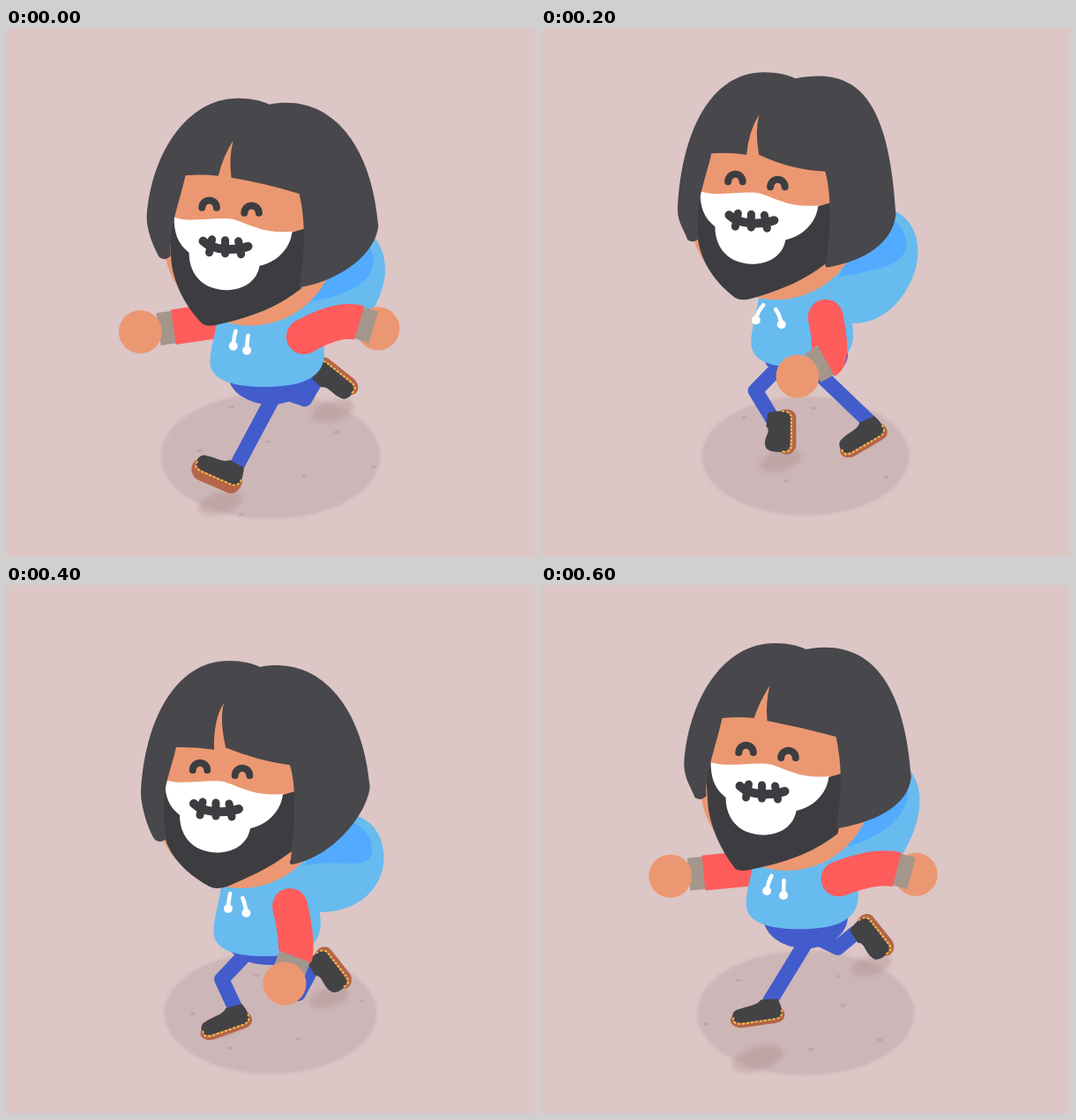
An HTML page with a canvas that plays this animation: 600x600 px, repeating every 0.64 s.

```html
<!DOCTYPE html>
<html lang="en">
<head>
<meta charset="utf-8">
<title>Running character</title>
<style>
html, body { margin: 0; width: 100%; height: 100%; overflow: hidden; background: #dcc6c6; }
canvas { display: block; width: 600px; height: 600px; }
</style>
</head>
<body>
<canvas id="stage" width="600" height="600"></canvas>
<script>
const ctx = document.getElementById('stage').getContext('2d');
const LOOP = 640, STRIDE = 320, STEP = 40, TAU = Math.PI * 2;
const { sin, cos, hypot, max, min, sqrt } = Math;
const C = {
  bg: '#dcc6c6', ground: '#cdb6b7', speck: '#bfa5a6', hair: '#48474b', beard: '#3d3d41',
  skin: '#eb9872', shirt: '#68bbee', lining: '#52abff', sleeve: '#ff5c5c', cuff: '#a4968b',
  pants: '#425ccb', shoe: '#434346', sole: '#b56549', stitch: '#f4c744', white: '#ffffff'
};

// Key points of one step: time, x, y, angle in degrees.
const FOOT_PATH = [
  [0, 243, 501, 25], [80, 276, 511, -18], [200, 364, 463, -29], [290, 402, 414, -133],
  [420, 357, 443, -122], [520, 299, 473, -88], [600, 246, 485, -7]
];
// Key points of one arm swing: time, x, y.
const HAND_PATH = [
  [0, 422, 341], [120, 377, 412], [200, 291, 395],
  [300, 270, 405], [400, 316, 452], [520, 410, 331]
];

// Smooth closed curve through rows of [time, ...values].
function sample(rows, time) {
  const n = rows.length, t = time % LOOP;
  let i = n - 1;
  while (rows[i][0] > t) i--;
  const key = k => {
    const lap = Math.floor(k / n), row = rows[k - lap * n];
    return { t: row[0] + lap * LOOP, v: row };
  };
  const [a, b, c, d] = [key(i - 1), key(i), key(i + 1), key(i + 2)];
  const h = c.t - b.t, u = (t - b.t) / h, u2 = u * u, u3 = u2 * u;
  return b.v.slice(1).map((p, k) => {
    const j = k + 1, q = c.v[j];
    const m0 = (q - a.v[j]) / (c.t - a.t) * h;
    const m1 = (d.v[j] - p) / (d.t - b.t) * h;
    return (2 * u3 - 3 * u2 + 1) * p + (u3 - 2 * u2 + u) * m0 +
      (3 * u2 - 2 * u3) * q + (u3 - u2) * m1;
  });
}

// Middle joint of a two-part limb; side picks the way it bends.
function joint(x0, y0, x1, y1, a, b, side) {
  const dx = x1 - x0, dy = y1 - y0, d = hypot(dx, dy);
  const along = d < a + b ? (a * a + d * d - b * b) / (2 * d) : d * a / (a + b);
  const out = d < a + b ? side * sqrt(max(0, a * a - along * along)) : 0;
  return [x0 + (dx * along - dy * out) / d, y0 + (dy * along + dx * out) / d];
}

// Each segment holds 2, 4 or 6 numbers: line, quadratic or cubic.
function trace(x, y, ...segments) {
  ctx.beginPath();
  ctx.moveTo(x, y);
  for (const s of segments) {
    if (s.length === 2) ctx.lineTo(...s);
    else if (s.length === 4) ctx.quadraticCurveTo(...s);
    else ctx.bezierCurveTo(...s);
  }
}
function fill(color) {
  ctx.fillStyle = color;
  ctx.fill();
}
function stroke(color, width, cap = 'round') {
  ctx.strokeStyle = color;
  ctx.lineWidth = width;
  ctx.lineCap = cap;
  ctx.lineJoin = 'round';
  ctx.stroke();
}
function oval(x, y, rx, ry, color, angle = 0) {
  ctx.beginPath();
  ctx.ellipse(x, y, rx, ry, angle, 0, TAU);
  fill(color);
}
function softOval(blur, ...shape) {
  ctx.save();
  ctx.filter = `blur(${blur}px)`;
  oval(...shape);
  ctx.restore();
}

function drawGround(t, radius) {
  softOval(1.5, 300, 485.5, radius, radius * 0.573, C.ground);
  for (let i = 1; i <= 14; i++) {
    const u = (i * 0.755 + t / STRIDE) % 1 - 0.5, v = (i * 0.57) % 1 - 0.5;
    const x = 258 * u + 130 * v, y = 150 * v - 147 * u;
    if (hypot(x, y / 0.573) < radius * 0.97) oval(300 + x, 485.5 + y, 3, 1.7, C.speck);
  }
}

function drawShoe(x, y, turn) {
  const side = sin(turn) ** 2, toe = 6 + 8 * side, depth = 5 + 13 * max(0, sin(turn));
  ctx.save();
  ctx.translate(x, y);
  ctx.rotate(turn);
  ctx.scale(1 - 0.18 * side, 1 + 0.2 * side);
  trace(-27, -1, [-37, 4, -31, 10 + depth, -18, 10 + depth], [19, 9 + depth],
    [30, 9 + depth, 33, 4, 27, -2]);
  fill(C.sole);
  trace(5, -14, [24, -13], [27, -7, 28, 0, 27, 5], [22, 9], [-20, 9],
    [-32, 9, -32, 1 - toe, -22, -toe], [-11, -toe - 3, 0, -8, 5, -14]);
  fill(C.shoe);
  trace(-28, 2, [-31, 10, -23, 10.5, -17, 10.5], [19, 9.5], [26, 9, 28, 4, 27, 0]);
  ctx.setLineDash([3, 2]);
  stroke(C.stitch, 1.8, 'butt');
  ctx.restore();
}

function footAt(t, dx, dy) {
  const [x, y, degrees] = sample(FOOT_PATH, t);
  const drop = max(4, 539 - 0.576 * (x - 243) - y);
  softOval(2.5, x + dx, y + dy + drop, 15 + 0.28 * drop, 7 + 0.13 * drop,
    'rgba(165,125,130,.3)', -0.28);
  return { x: x + dx, y: y + dy, turn: degrees * Math.PI / 180 };
}

function drawLeg({ x, y, turn }, hipX, hipY, fold) {
  const ax = x + 15 * cos(turn) + 11 * sin(turn);
  const ay = y + 15 * sin(turn) - 11 * cos(turn);
  // Foreshortening trades thigh length for shin length.
  const knee = joint(hipX, hipY, ax, ay, 53 + 14 * fold, 33 - 7 * fold, 1);
  trace(hipX, hipY, knee, [ax, ay]);
  stroke(C.pants, 17);
  drawShoe(x, y, turn);
}

function drawArm(sx, sy, hx, hy, bends) {
  const [ex, ey] = bends ? joint(sx, sy, hx, hy, 46, 46, -1) : [(sx + hx) / 2, (sy + hy) / 2];
  const len = hypot(hx - ex, hy - ey) || 1;
  const ux = (hx - ex) / len, uy = (hy - ey) / len, reach = 30 - 8 * ux;
  const wx = hx - ux * reach, wy = hy - uy * reach;
  const hand = () => oval(hx, hy, 24.5, 24.5, C.skin);
  const front = ux < 0;
  if (!front) hand();
  trace(wx - ux * 2, wy - uy * 2, [wx + ux * 17, wy + uy * 17]);
  stroke(C.cuff, 37, 'butt');
  oval(sx, sy, 20, 20, C.sleeve);
  trace(sx, sy, [ex, ey, wx, wy]);
  stroke(C.sleeve, 40, 'butt');
  if (front) hand();
}

function drawHood(x, y, end, tail) {
  trace(x - 100, y - 30, [x - 30, y - 48], [x - 12, y - 42, x, y - 25, x, y],
    [x, y + 32, x - 28, end, x - 72, end], [x - 150, end]);
  fill(C.shirt);
  trace(x - 90, tail, [x - 45, tail - 8, x - 14, y + 16, x - 13, y - 10],
    [x - 14, y - 32, x - 35, y - 46, x - 60, y - 46]);
  fill(C.lining);
}

function drawShirt(left, right, bottom) {
  trace(left + 10, bottom - 90, [left + 7, bottom - 60, left, bottom - 45, left, bottom - 28],
    [left, bottom - 5, 265, bottom, 292, bottom],
    [327, bottom, right, bottom - 6, right, bottom - 38],
    [right - 2, bottom - 60], [right - 20, bottom - 90]);
  fill(C.shirt);
}

function drawString(x, y, dx, dy) {
  trace(x, y, [x + dx * 0.75, y + dy * 0.4, x + dx, y + dy]);
  stroke(C.white, 4.5);
  oval(x + dx, y + dy, 5, 5, C.white);
}

function drawFace(chin) {
  oval(46, 40, 98, 98, C.skin);
  trace(-26, -78, [98, -78], [112, 30], [-42, 20]);
  fill(C.skin);

  trace(-47, 7, [-40, 15], [30, 50], [94, 32], [111, 27], [112, 60, 104, 96],
    [80, 115, 50, 128, chin + 16, 136], [chin + 4, 140, chin - 4, 136],
    [-30, 113, -40, 88, -43, 66]);
  fill(C.beard);

  trace(-40, 15, [-20, 22, 12, 13, 30, 18], [50, 25, 65, 34, 94, 31],
    [92, 52, 74, 67, 57, 70], [54, 88, 38, 97.5, 19, 97.5],
    [-6, 97, -23, 81, -23, 55], [-36, 45, -40, 32, -40, 15]);
  fill(C.white);

  for (const eye of [0, 1]) {
    ctx.beginPath();
    ctx.arc(eye * 48, 4 + eye * 6, 8.3, Math.PI, TAU);
    stroke(C.beard, 8);
  }

  trace(-7, 42, [4, 53, 30, 53, 44, 48]);
  stroke(C.beard, 10);
  for (const i of [-1, 0, 1]) {
    trace(18 + 16 * i - i, 41 + i, [18 + 18 * i, 56 + i]);
    stroke(C.beard, 9);
  }
}

// flare: strands hang low; drift: sides swing down; lift: right side opens.
function drawHair(flare, drift, lift) {
  const lx = -27, ly = -27.5 + 7.5 * flare;
  const sx = -67.5 + 3.5 * drift, sy = 28 + 13 * drift;
  const tx = -46 + 4 * flare, ty = 71 + 16 * flare;
  const rx = 188 + 6 * lift, ry = 31 - 10 * lift;
  const by = 102 + 12 * flare, fy = -7 + 7 * flare;
  const px = 13 + 4 * flare, py = -26 + 9 * flare;
  const qx = 27 + 3 * flare, qy = -26 + 6 * flare;
  trace(lx, ly,
    [lx - 8, ly + 35, -47, 30, tx + 5, ty - 2],
    [tx - 1, ty + 5, tx - 8, ty],
    [sx + 9, ty - 9, sx, sy + 16, sx, sy],
    [sx + 4, -52, -28, -121, 34, -120],
    [48, -120, 60, -117, 68, -113],
    [135, -126, rx - 8, ry - 112 + 25 * lift, rx, ry],
    [rx - 3, ry + 31, 150, by - 8, 105, by],
    [100, by, 103, by - 6],
    [112, 30, 102, fy],
    [(102 + qx) / 2, (fy + qy) / 2 + 4 + 7 * drift, qx, qy],
    [22, -52, 27, -72],
    [15, -53, px, py],
    [(lx + px) / 2, (ly + py) / 2 - 2, lx, ly]);
  fill(C.hair);
}

function render(t) {
  const swing = t / LOOP * TAU;
  const beat = (phase, n = 1) => cos(n * 2 * swing - phase);
  const flare = beat(2.3), drift = beat(3), lift = beat(0.9);
  const sway = cos(swing - 560 / LOOP * TAU);

  const ex = 223.8 + 6 * beat(-0.68) + 3 * sway;
  const ey = 188.6 + 19 * lift + 3.7 * beat(2.3, 2) + 2.5 * sway;
  const hem = 400.7 + 20.3 * beat(1.16) + 3.5 * beat(2.1, 2);
  const hoodX = 428.5 + 1.5 * beat(0);
  const hoodY = 274.4 + 32.8 * beat(1.42) + 4 * beat(1.37, 2) - 6 * cos(swing);
  const pelvis = 29 + 7 * beat(-0.79), fold = beat(-0.44);

  ctx.fillStyle = C.bg;
  ctx.fillRect(0, 0, 600, 600);
  drawGround(t, 120.5 + 4 * beat(0));
  const far = footAt(t + STRIDE, -27, -16), near = footAt(t, 0, 0);

  const [fx, fy] = sample(HAND_PATH, t + STRIDE), [nx, ny] = sample(HAND_PATH, t);
  drawArm(262 - 15 * cos(swing), hem - 76 - 16 * sin(swing), fx - 122, fy - 70, false);
  drawLeg(far, 277, hem - 8, fold);
  drawLeg(near, 309, hem + 1, fold);
  oval(300, hem - 14, 48, pelvis, C.pants);
  drawHood(hoodX, hoodY, hem - 50, ey + 112);
  drawShirt(235.5 - 4 * beat(0), 357 + 4 * beat(0), hem);

  ctx.save();
  ctx.translate(ex, ey);
  drawFace(5 + 13 * flare);
  drawHair(flare, drift, lift);
  drawString(32 + 3 * flare, 144, -5 + 3.5 * lift, 17);
  drawString(46 + 3 * flare, 149, 3.5 + 5 * drift, 17);
  ctx.restore();

  drawArm(328 + 10 * cos(swing + 0.15), hem - 57, nx, ny, true);
}

const start = performance.now();
function tick() {
  const elapsed = performance.now() - start + 6;
  render(Math.floor(elapsed / STEP) * STEP % LOOP);
  requestAnimationFrame(tick);
}
tick();
</script>
</body>
</html>
```
